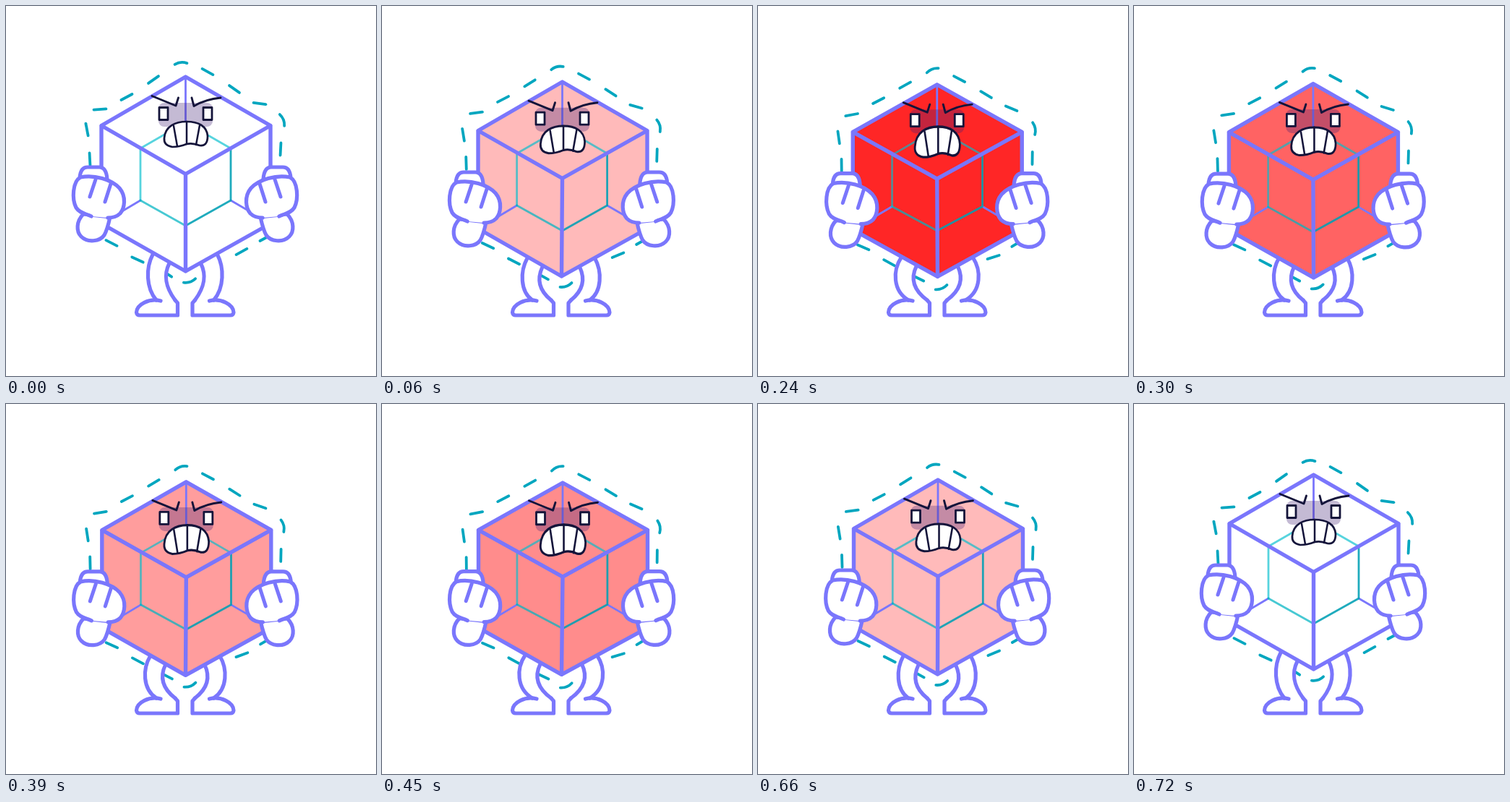
Write an HTML page with a canvas that moves like this. It is 512 by 512 pixels and loops after 0.75 s.

```html
<!DOCTYPE html>
<html lang="en">
<head>
<meta charset="utf-8">
<title>Angry cube</title>
<style>
html, body { margin: 0; width: 100%; height: 100%; overflow: hidden; background: #fff; }
canvas { display: block; width: 512px; height: 512px; }
</style>
</head>
<body>
<canvas id="stage" width="512" height="512"></canvas>
<script>
const ctx = document.getElementById('stage').getContext('2d');
const LOOP = 750, STEP = 30;
const PURPLE = '#7a76fc', TEAL = '#00a6bf', INK = '#14143a';

// time, pose (0 tall, 1 low, 2 squashed), red, body dx, body dy
const KEYS = [
  [0, 0, 0, 0, 0],
  [60, 1, .27, 1, 0],
  [150, 2, .92, -.7, 0],
  [180, 2, 1, -.8, 0],
  [300, 1.1, .61, -.6, 2],
  [375, 1.2, .38, .6, 1.7],
  [450, 1.6, .45, 1.5, 1],
  [540, 2, 1, 1.5, 0],
  [570, 2, .9, 1.4, 0],
  [660, 1, .27, .5, 0],
  [720, 0, 0, 0, 0]
];

// halo dashes when squashed: x, y, angle, then lift and turn when tall
const HALO = [
  [242, 90, -27, 10, 21],
  [279, 102, 27, 11, 2],
  [316, 123, 30, 8, 5],
  [351, 142, 29, 7, -22],
  [382, 171, 84, 13, -16],
  [380, 212, 90, 14, 3],
  [359, 329, 148, 8, 4],
  [326, 348, 167, 8, -16],
  [254, 390, 157, 10, 5],
  [222, 377, 23, 7, 10],
  [182, 355, 30, 4, -5],
  [146, 334, 22, 6, 5],
  [116, 221, 90, 9, -3],
  [112, 183, 83, 12, -4],
  [130, 151, -13, 8, 9],
  [167, 131, -27, 5, -1],
  [204, 110, -27, 8, -8]
];

// monotone cubic through the keys
function sample(t, col) {
  let i = 0;
  while (i < KEYS.length - 2 && t >= KEYS[i + 1][0]) i++;
  const rate = k => k < 0 || k > KEYS.length - 2 ? 0 :
    (KEYS[k + 1][col] - KEYS[k][col]) / (KEYS[k + 1][0] - KEYS[k][0]);
  const slope = k => {
    const a = rate(k - 1), b = rate(k);
    return a * b > 0 ? 2 * a * b / (a + b) : 0;
  };
  const h = KEYS[i + 1][0] - KEYS[i][0], u = (t - KEYS[i][0]) / h;
  const p = KEYS[i][col], q = KEYS[i + 1][col], s = u * u * (3 - 2 * u);
  return p + (q - p) * s + h * u * (1 - u) * (slope(i) * (1 - u) - slope(i + 1) * u);
}

function shape(d, width, stroke, fill) {
  const path = new Path2D(d);
  if (fill) { ctx.fillStyle = fill; ctx.fill(path); }
  if (width) { ctx.lineWidth = width; ctx.strokeStyle = stroke; ctx.stroke(path); }
}

function place(x, y, sx, sy, fn) {
  ctx.save();
  ctx.translate(x, y);
  ctx.scale(sx, sy);
  fn();
  ctx.restore();
}

function drawHalo(mix, dx, dy) {
  const lift = mix(1, .4, 0), turn = mix(1, .6, 0);
  HALO.forEach(([x, y, angle, up, twist], i) => {
    const bend = i % 4 || i > 8 ? 0 : -4;
    place(x + dx, y - up * lift + dy, 1, 1, () => {
      ctx.rotate((angle + twist * turn) * Math.PI / 180);
      shape(`M-8.5 0Q0 ${bend} 8.5 0`, 3.8, TEAL);
    });
  });
}

function drawLeg(mix) {
  const top = mix(203, 201, 196), out = mix(193.5, 191, 182.5);
  const inTop = mix(226, 222, 217), inn = mix(218, 214.5, 209);
  const y = mix(344, 349, 347), yi = y + 12;
  const outer = `M${top} ${y}C${out} ${y + 18} ${out} ${y + 46} 208 407`;
  shape(`${outer}H234C${inn + 2} ${yi + 32} ${inn} ${yi + 16} ${inTop} ${yi}Z`, 0, '', '#fff');
  shape('M214 408C198 404 181 413 180.5 424Q181 428 185 428H237.5V411L234 407', 5.2, PURPLE, '#fff');
  shape(outer, 5.2, PURPLE);
  shape(`M${inTop} ${yi}C${inn} ${yi + 16} ${inn + 2} ${yi + 32} 234 407`, 5.2, PURPLE);
}

function drawHand() {
  shape('M107 288C97 298 97 312 104 319C113 328 130 326 136 317Q140 310 144 292Z', 5.2, PURPLE, '#fff');
  shape('M102 238Q103 223 113 223H129Q139 223 140 240Z', 5.2, PURPLE, '#fff');
  shape('M118 291C110 287 102 287 97 279C91 267 92 243 103 237C122 233 146 240 157 252C167 264 164 280 158 287Q152 293 141 293',
    5.2, PURPLE, '#fff');
  shape('M124 240L116 264M145 246L137 271', 5, PURPLE);
}

function drawCube(mix, red, dx, dy) {
  const cx = 248.5 + dx, l = 132 + dx, r = 366 + dx, il = 186 + dx * .6, ir = il + 125;
  const top = mix(98, 105, 110) + dy, side = mix(165.5, 172.5, 174) + dy;
  const mid = mix(232.5, 238.5, 238) + dy, low = mix(301, 308, 309) + dy;
  const end = mix(367, 374, 373) + dy;
  const iTop = mix(197, 204, 206) + dy, iLow = mix(269, 276, 277) + dy;
  const iEnd = mix(304, 311, 309) + dy, iBack = iTop - 36;
  const hex = `M${cx} ${top}L${r} ${side}V${low}L248.5 ${end}L${l} ${low}V${side}Z`;

  shape(hex, 0, '', '#fff');
  shape(hex, 0, '', `rgba(255,0,0,${red})`);
  shape(`M${cx} ${top}V${iBack}M${il} ${iLow}L${l} ${low}M${ir} ${iLow}L${r} ${low}`, 2.8, PURPLE);
  shape(`M${il} ${iLow}V${iTop}L${cx} ${iBack}L${ir} ${iTop}`, 2.8, 'rgba(0,190,205,.66)');
  shape(`M${il} ${iLow}L${cx} ${iEnd}`, 2.8, 'rgba(0,180,195,.72)');
  shape(`M${cx} ${iEnd}L${ir} ${iLow}V${iTop}`, 2.8, 'rgba(0,160,180,.88)');
  shape(`${hex}M${l} ${side}L${cx} ${mid}L${r} ${side}M${cx} ${mid}L248.5 ${end}`, 5.4, PURPLE);
}

function drawFace(mix, dx, dy) {
  place(dx, mix(0, 6.7, 9.3) + dy, 1, 1, () => {
    ctx.fillStyle = 'rgba(64,32,118,.31)';
    ctx.beginPath();
    ctx.roundRect(211, 134, 75, 33, 8);
    ctx.fill();
    shape('M212 140.5h12v17h-12ZM273 140.5h12v17h-12Z', 2.8, INK, '#fff');
    shape('M202 124.5L235 138L238.5 127M297 127Q276 129 260 138.5L257 127', 2.9, INK);
  });
  place(249 + dx, mix(160, 166, 166) + dy, mix(1, 1.02, 1.05), mix(1, 1.08, 1.31), () => {
    shape('M-30 23C-29 6-14 0 1 0C17 0 29 6 30 20C30 30 26 34 19 33Q9 29 1 31Q-9 35-19 35Q-31 33-30 23Z',
      2.7, INK, '#fff');
    shape('M-17 6L-12 34M1 0V31M19 5L14 32', 2.5, INK);
  });
}

function draw(t) {
  const [m, red, dx, dy] = [1, 2, 3, 4].map(c => sample(t, c));
  const mix = (a, b, c) => m < 1 ? a + (b - a) * m : b + (c - b) * (m - 1);
  const handY = mix(0, 7, 8) + dy;

  ctx.fillStyle = '#fff';
  ctx.fillRect(0, 0, 512, 512);
  ctx.lineCap = ctx.lineJoin = 'round';
  drawHalo(mix, dx * .5, dy);
  drawLeg(mix);
  place(495.5, 0, -1, 1, () => drawLeg(mix));
  drawCube(mix, red, dx, dy);
  drawFace(mix, dx, dy);
  place(.6 * m - .5 * dx, handY, 1, 1, drawHand);
  place(496 + 1.3 * dx - .6 * m, handY, -1, 1, drawHand);
}

function tick() {
  const t = performance.now() % LOOP;
  draw(Math.floor(t / STEP) * STEP);
  requestAnimationFrame(tick);
}
tick();
</script>
</body>
</html>
```
